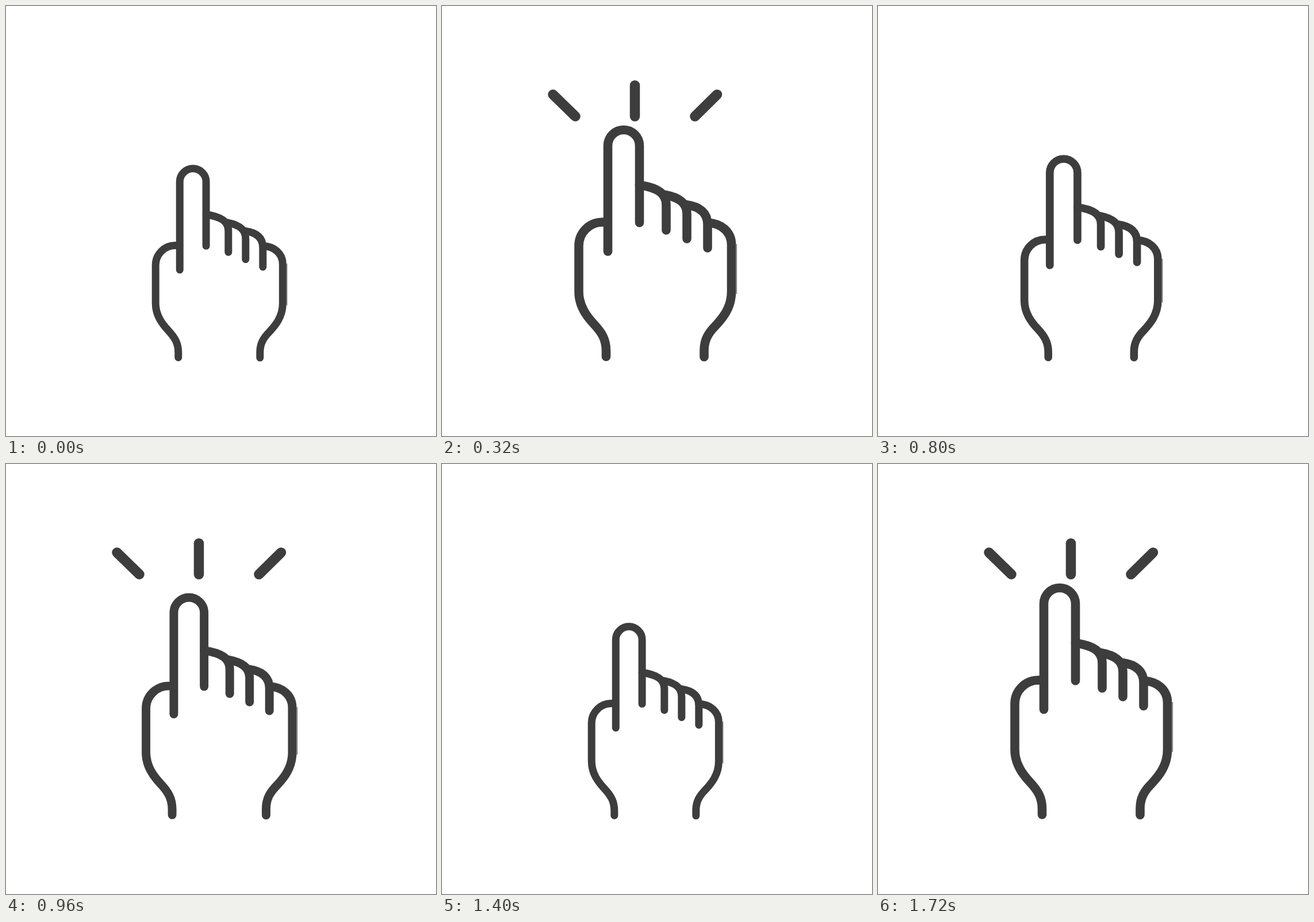
An HTML page that plays this animation: 748 px wide and 748 px high, repeating every 1920 ms.

```html
<!DOCTYPE html>
<html lang="en">
<head>
<meta charset="utf-8">
<title>Pointing hand</title>
<style>
  html, body { margin: 0; width: 100%; height: 100%; overflow: hidden; background: #fff; }
  svg { display: block; width: 100%; height: 100%; }
  path { fill: none; stroke: #3d3d3d; stroke-linecap: round; stroke-linejoin: round; }
  #hand path { stroke-width: 15.6; }
  #hand .edge { stroke: #777; stroke-width: 1.6; stroke-linecap: butt; }
</style>
</head>
<body>
<svg viewBox="0 0 748 748">
  <g id="hand">
    <path class="edge" d="M512.3 414V501"/>
    <!-- index finger -->
    <path d="M288.5 427V243A27.5 27.5 0 0 1 343.5 243V377"/>
    <!-- folded fingers -->
    <path d="M343.5 311.5C374 316 390 325 390 346V390"/>
    <path d="M388 328.5C412 333 426 342 426 362V405"/>
    <path d="M424 345.5C450 349 462 361 462 380V421"/>
    <!-- palm sides and wrist -->
    <path d="M288 376H279C256.4 376 238 394.4 238 417V497C238 522 252 540 264 553C278 568 285.5 580 285.5 600V610"/>
    <path d="M462 377C486 378 503.5 393 503.5 415V497C503.5 525 488 543 476 556C464 568 456 580 456 599V610.5"/>
  </g>
  <path id="rays" d="M193 154L232 192M335.5 138V192M478.5 154L440 192"/>
</svg>
<script>
  const LOOP = 1920, STEP = 40, LAST = 43;
  const ANCHOR = [371, 618.7], MIN_SCALE = 0.833;
  // [step, growth] pairs, linear in between
  const KEYS = [[0, 0], [8, 1], [18, 0], [26, 1], [35, 0], [43, 1]];
  const hand = document.getElementById('hand');
  const rays = document.getElementById('rays');

  function growthAt(step) {
    const i = Math.max(1, KEYS.findIndex(([at]) => at >= step));
    const [t0, v0] = KEYS[i - 1], [t1, v1] = KEYS[i];
    return v0 + (v1 - v0) * (step - t0) / (t1 - t0);
  }

  function draw(time) {
    const step = Math.min(LAST, Math.floor((time % LOOP) / STEP));
    const growth = growthAt(step);
    const scale = MIN_SCALE + (1 - MIN_SCALE) * growth;
    const [x, y] = ANCHOR;
    hand.setAttribute('transform', `translate(${x} ${y}) scale(${scale}) translate(${-x} ${-y})`);
    // rays switch on halfway up and thicken quickly
    const lit = growth > 0.499;
    rays.setAttribute('visibility', lit ? 'visible' : 'hidden');
    rays.setAttribute('stroke-width', Math.min(17.5, 14.6 + 15 * Math.max(0, growth - 0.5)));
  }

  const start = performance.now();
  function tick() {
    draw(performance.now() - start);
    requestAnimationFrame(tick);
  }
  tick();
</script>
</body>
</html>
```
